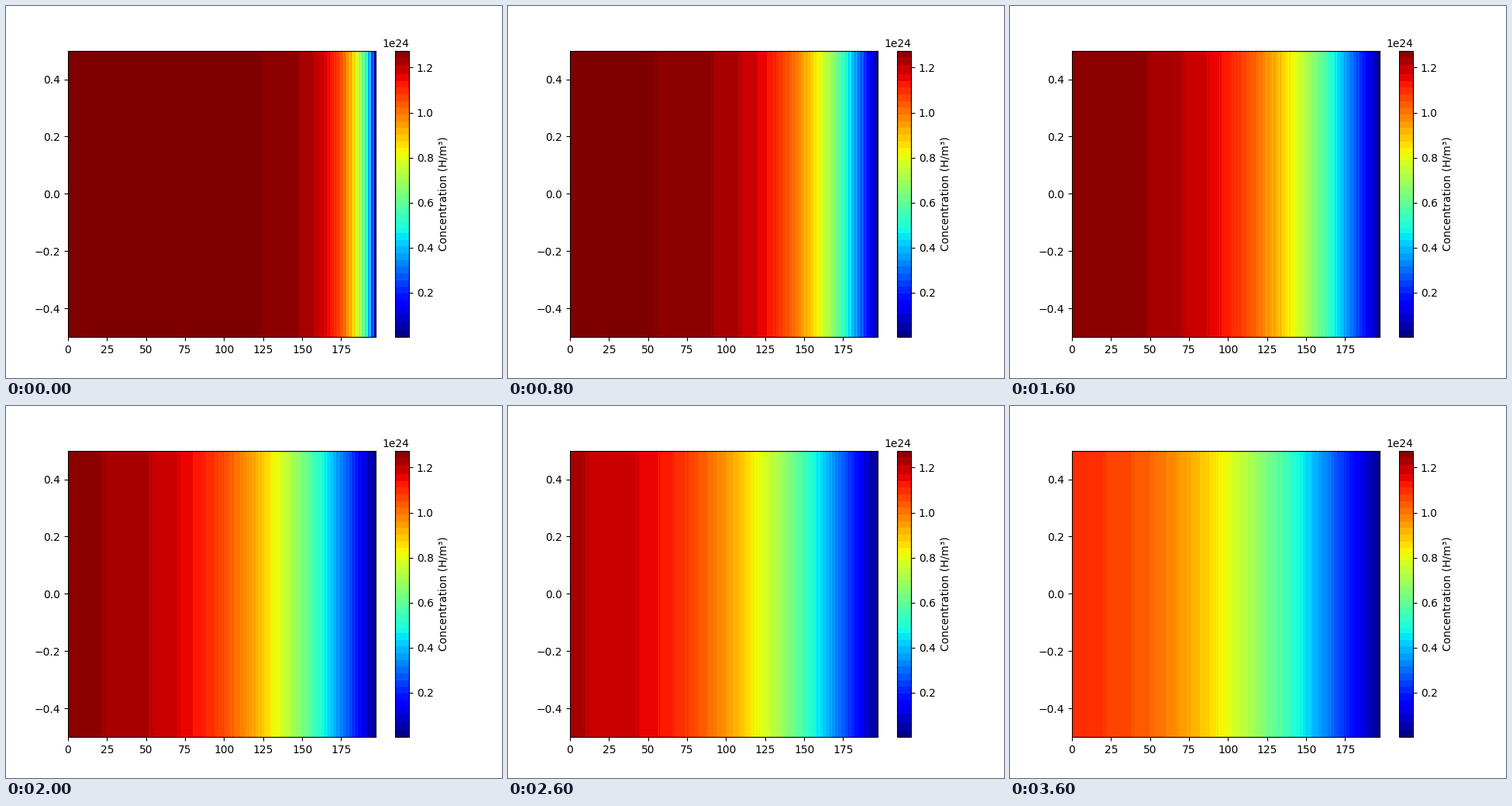
A matplotlib script that plays this animation: 640 px wide and 480 px high, repeating every 3.8 s.

```python
import matplotlib.pyplot as plt
import numpy as np
from matplotlib.animation import FuncAnimation
from matplotlib.colors import ListedColormap

FRAMES, STEP_MS = 19, 200
CELLS = 99             # finite elements across the slab
C0 = 1.275e24          # initial concentration
C_MIN = 0.003e24
RATE, GROWTH = 44.4, 1.06   # diffusion per step, in cells squared


def banded_jet():
    """Jet reduced to a few dozen flat bands, wider at both dark ends."""
    edges = np.r_[0, 1, 6, 13, 21, 28,
                  np.linspace(28, 229, 35)[1:],
                  235, 243, 250, 255, 256].astype(int)
    colors = plt.get_cmap("jet")(np.arange(256))
    for a, b in zip(edges[:-1], edges[1:]):
        colors[a:b] = colors[a:b].mean(axis=0)
    return ListedColormap(colors)


def diffuse():
    """Implicit Euler outgassing: closed left side, empty right side."""
    n = CELLS + 1
    lap = 2 * np.eye(n) - np.eye(n, k=1) - np.eye(n, k=-1)
    lap[0, 1] = -2
    lap[-1] = 0
    c = np.full(n, C0)
    c[-1] = C_MIN
    states = []
    for k in range(FRAMES):
        c = np.linalg.solve(np.eye(n) + RATE * GROWTH**k * lap, c)
        states.append(c)
    return states


def as_row(c):
    """Two values per element, far node first, which gives the fine stripes."""
    pairs = np.column_stack([c[1:], c[:-1]])
    return pairs.ravel()[:-1][np.newaxis, :]


rows = [as_row(c) for c in diffuse()]

fig, ax = plt.subplots(figsize=(6.4, 4.8), dpi=100)
image = ax.imshow(rows[0], cmap=banded_jet(), vmin=C_MIN, vmax=C0,
                  aspect="auto", extent=(0, rows[0].size, -0.5, 0.5))
fig.colorbar(image, ax=ax, label="Concentration (H/m³)")


def update(i):
    image.set_data(rows[i])
    return (image,)


anim = FuncAnimation(fig, update, frames=FRAMES, interval=STEP_MS,
                     repeat=True, repeat_delay=0, blit=False)
plt.show()
```
